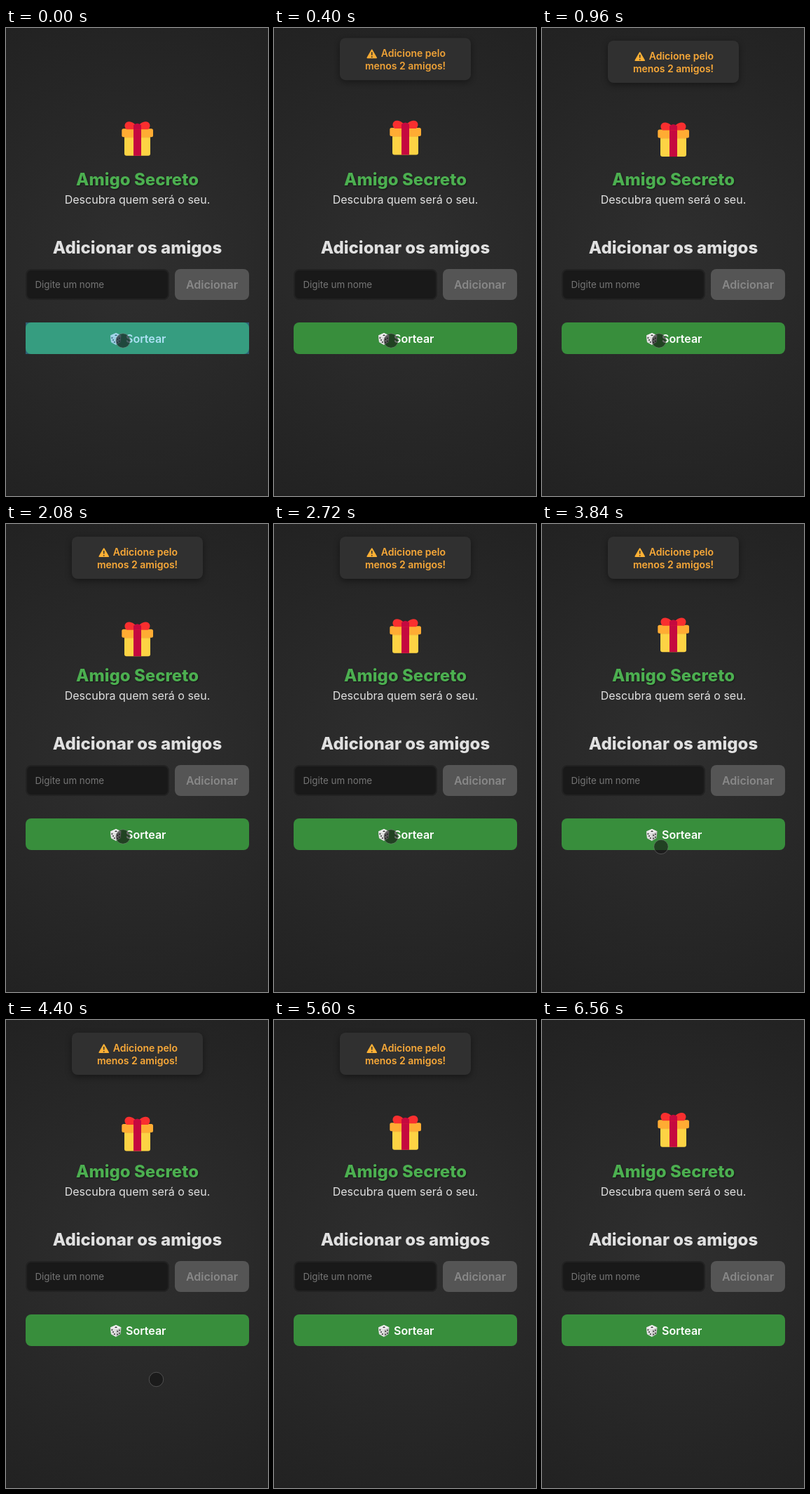
An HTML page for the animation above (6640 ms loop, 374x666 px).

```html
<!DOCTYPE html>
<html lang="pt-BR">
<head>
<meta charset="utf-8">
<title>Amigo Secreto</title>
<style>
  html, body { margin: 0; width: 100%; height: 100%; overflow: hidden; background: #242424; }
  svg { display: block; width: 374px; height: 666px; }
  text { font-family: Inter, "Open Sans", sans-serif; font-size: 16px; font-weight: 600; }
  .middle { text-anchor: middle; }
  .heading { font-size: 24px; font-weight: 800; }
  .title { fill: #4caf50; text-shadow: 1px 1px 2px rgba(0, 0, 0, .5); }
  .light { fill: #e0e0e0; }
  .regular { font-weight: 400; }
  .placeholder { font-size: 13.333px; font-weight: 400; fill: #757575; }
  .warning { font-size: 14px; fill: #f9a938; }
  #toast rect { filter: drop-shadow(0 3px 5px rgba(0, 0, 0, .4)); }
</style>
</head>
<body>
<svg viewBox="0 0 374 666">
  <defs>
    <radialGradient id="backdrop" gradientUnits="userSpaceOnUse" cx="187" cy="333" r="382">
      <stop stop-color="#2f2f2f"/>
      <stop offset="1" stop-color="#222"/>
    </radialGradient>
  </defs>
  <rect width="374" height="666" fill="url(#backdrop)"/>
  <rect y="664" width="374" height="2" fill="#202020"/>

  <g id="gift">
    <rect x="169" y="149" width="37" height="31.5" rx="3" fill="#fdd344"/>
    <rect x="169" y="153" width="37" height="2" fill="#f6b73c"/>
    <rect x="165.3" y="142" width="44.7" height="12" rx="2.5" fill="#ffac33"/>
    <path d="M182 142V180.5H193V142Z" fill="#c5093f"/>
    <path d="M186 143H172C167 138 170 131.5 176 131.8C181 132 183 135 187.5 138
             C192 135 194 132 199 131.8C205 131.5 208 138 203 143Z" fill="#f92f2f"/>
    <path d="M182 143V137Q187.5 132 193 137V143Z" fill="#c5093f"/>
  </g>

  <text class="middle heading title" x="187.5" y="224">Amigo Secreto</text>
  <text class="middle regular light" x="187.5" y="250">Descubra quem será o seu.</text>
  <text class="middle heading light" x="187.5" y="321">Adicionar os amigos</text>

  <rect x="29" y="344" width="203" height="42" rx="7" fill="#191919" stroke="#222" stroke-width="2"/>
  <text class="placeholder" x="41.5" y="370">Digite um nome</text>
  <rect x="241" y="343" width="106" height="44" rx="8" fill="#555"/>
  <text class="middle" x="294" y="371" fill="#888">Adicionar</text>

  <rect x="28" y="419" width="319" height="45" rx="8" fill="#388e3c"/>
  <g id="dice">
    <path d="M149 437.5L157 434L164.5 437.5L163.5 447L157 451L150 447Z" fill="#c9c9c9"/>
    <path d="M149 437.5L157 434L164.5 437.5L157 440.5Z" fill="#f0f0f0"/>
    <path d="M149 437.5L157 440.5V451L150 447Z" fill="#dedede"/>
    <g fill="#333">
      <ellipse cx="157" cy="437.3" rx="1.7" ry=".9"/>
      <circle cx="151.4" cy="441" r="1"/><circle cx="154.8" cy="447" r="1"/>
      <circle cx="153" cy="444" r="1"/>
      <circle cx="159.2" cy="443" r="1"/><circle cx="162" cy="441.5" r="1"/>
      <circle cx="159.2" cy="447.4" r="1"/><circle cx="162" cy="445.8" r="1"/>
    </g>
  </g>
  <text x="171" y="448" fill="#fff">Sortear</text>
  <rect id="highlight" x="28" y="419" width="319" height="45" fill="#33b5e5" fill-opacity=".4"/>

  <g id="toast">
    <rect x="94" y="18" width="187" height="60" rx="8" fill="#303030"/>
    <path d="M139.7 35L146.2 46.2H133.2Z" fill="#ffb135" stroke="#ffb135" stroke-width="1.6" stroke-linejoin="round"/>
    <path d="M139.7 38V42.5M139.7 44.2V45.8" stroke="#303030" stroke-width="1.6"/>
    <text class="warning" x="152.7" y="45">Adicione pelo</text>
    <text class="warning middle" x="187.5" y="63">menos 2 amigos!</text>
  </g>

  <circle id="pointer" r="10.2" fill="#141414" fill-opacity=".62" stroke="#888" stroke-opacity=".45"/>
</svg>
<script>
  const LOOP = 6640, STEP = 80;
  const FLOAT_PERIOD = 3000, FLOAT_REST = 3390, FLOAT_HEIGHT = 8;
  const POINTER_EXIT = 4640;
  // time, x, y
  const pointerPath = [
    [0, 167, 445], [2960, 167, 445], [3360, 142.7, 420.7],
    [3600, 142.7, 420.7], [4160, 212, 519], [4400, 214.5, 511.5]
  ];

  const [gift, highlight, toast, pointer] =
    ["gift", "highlight", "toast", "pointer"].map(id => document.getElementById(id));

  const progress = (t, from, to) => Math.min(1, Math.max(0, (t - from) / (to - from)));
  const easeInOut = p => p * p * (3 - 2 * p);
  const easeOut = p => 1 - (1 - p) ** 3;
  const move = (node, x, y) => node.setAttribute("transform", `translate(${x} ${y})`);

  function floatOffset(t) {
    const phase = ((t - FLOAT_REST) / FLOAT_PERIOD + 2) % 1;
    return FLOAT_HEIGHT * easeInOut(1 - Math.abs(2 * phase - 1));
  }

  function pointerAt(t) {
    let [, x, y] = pointerPath[0];
    for (let i = 1; i < pointerPath.length; i++) {
      const [t0, x0, y0] = pointerPath[i - 1], [t1, x1, y1] = pointerPath[i];
      if (t < t0) break;
      const p = easeInOut(progress(t, t0, t1));
      x = x0 + (x1 - x0) * p;
      y = y0 + (y1 - y0) * p;
    }
    return [x, y];
  }

  function draw(t) {
    move(gift, 0, floatOffset(t));
    highlight.setAttribute("opacity", 1 - progress(t, 80, 240));

    const shown = easeOut(progress(t, 120, 560));
    move(toast, 0, -80 * (1 - shown));
    toast.setAttribute("opacity", shown * (1 - progress(t, 6000, 6320)));

    move(pointer, ...pointerAt(t));
    pointer.setAttribute("visibility", t < POINTER_EXIT ? "visible" : "hidden");
  }

  const start = performance.now();
  function frame() {
    const t = (performance.now() - start) % LOOP;
    draw(Math.floor(t / STEP) * STEP);
    requestAnimationFrame(frame);
  }
  frame();
</script>
</body>
</html>
```
